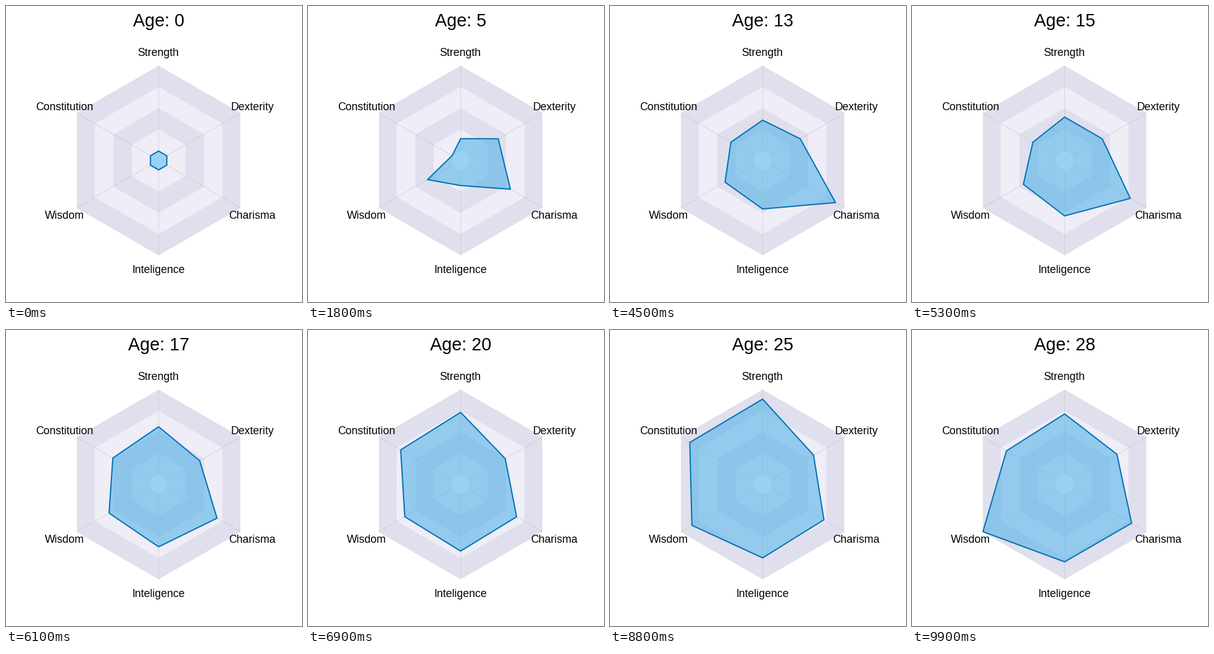
A matplotlib script that plays this animation: 480x480 px, repeating every 10000 ms.

```python
import numpy as np
import matplotlib.pyplot as plt
from matplotlib.animation import FuncAnimation
from matplotlib.patches import Polygon

SIZE, DPI = 480, 72
FRAMES, INTERVAL = 100, 100
LAST_AGE = 28
CENTER = np.array([247.5, 250.5])
RADIUS = 153
NAMES = ["Strength", "Dexterity", "Charisma",
         "Inteligence", "Wisdom", "Constitution"]

plt.rcParams["font.family"] = "Liberation Sans"

angles = np.arange(6) * np.pi / 3
AXES = np.column_stack([np.sin(angles), -np.cos(angles)])


def hexagon(r):
    """Corners at radius r, one number or one per axis."""
    return CENTER + RADIUS * AXES * np.reshape(r, (-1, 1))


def scores(age):
    """Abilities from 0 to 1, each a sum of linear phases of life."""
    def ramp(start, end):
        return np.clip((age - start) / (end - start), 0, 1)

    adult, late = ramp(15, 23), ramp(23, LAST_AGE)
    return np.array([
        0.4 * ramp(0, 14) + 0.6 * adult - 0.28 * late,
        0.4 * ramp(0, 5) + 0.17 * adult + 0.03 * late,
        ramp(0, 9) - 0.35 * ramp(10, 18) + 0.15 * ramp(22, LAST_AGE),
        0.65 * ramp(0, 18) + 0.15 * ramp(18, LAST_AGE),
        0.4 * ramp(0, 6) + 0.2 * ramp(14, 18) + 0.16 * ramp(18, 23) + 0.24 * late,
        0.32 * ramp(5, 12) + 0.68 * adult - 0.32 * late,
    ])


def outline(age):
    return hexagon(0.1 + 0.9 * scores(age))


fig = plt.figure(figsize=(SIZE / DPI, SIZE / DPI), dpi=DPI, facecolor="white")
ax = fig.add_axes([0, 0, 1, 1])
ax.set(xlim=(0, SIZE), ylim=(SIZE, 0))
ax.axis("off")

# Alternating bands around a white core
for i, r in enumerate(np.linspace(1, 0.1, 5)):
    color = "white" if i == 4 else ["#e0dfed", "#efedf6"][i % 2]
    ax.add_patch(Polygon(hexagon(r), fc=color, ec="none",
                         antialiased=False, zorder=i))

for a, b in zip(hexagon(0.1), hexagon(1)):
    ax.plot(*zip(a, b), color="#bebebe", alpha=0.5, lw=1, snap=False, zorder=6)

for name, (x, y) in zip(NAMES, hexagon(1.15)):
    ax.text(x - 0.6, y + 6.2, name, size=17.7,
            ha="center", va="baseline", zorder=9)

shape = ax.add_patch(Polygon(outline(0), fc=(0.337, 0.706, 0.914, 0.6),
                             ec="#0072b2", lw=2, joinstyle="round", zorder=8))
title = ax.text(CENTER[0], 33, "", size=28.7, ha="center", va="baseline")


def update(i):
    age = i * LAST_AGE / (FRAMES - 1)
    shape.set_xy(outline(age))
    title.set_text(f"Age: {round(age)}")
    return shape, title


anim = FuncAnimation(fig, update, frames=FRAMES, interval=INTERVAL,
                     repeat=True, repeat_delay=0)
plt.show()
```
